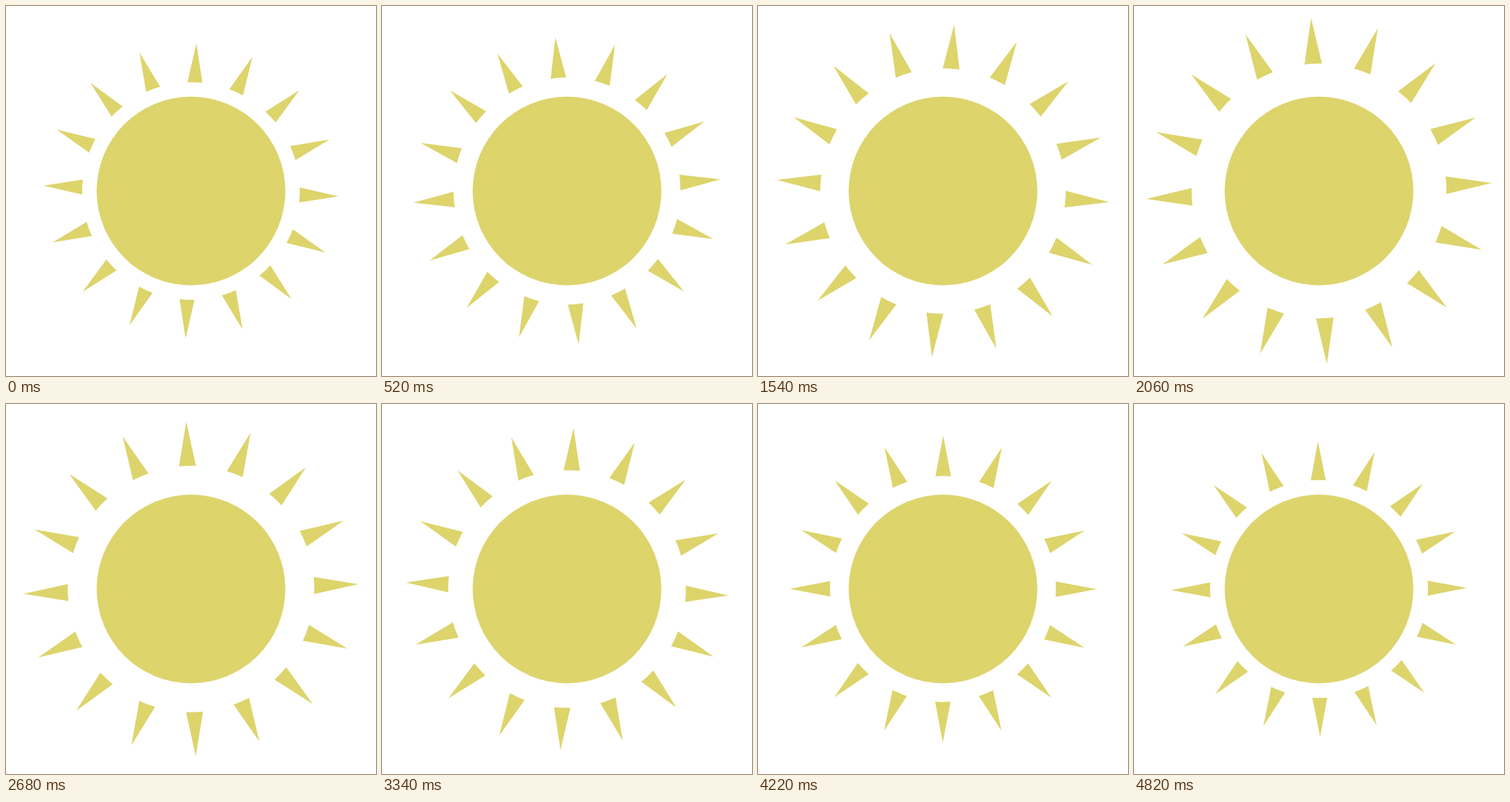
An HTML page that plays this animation: 500x500 px, repeating every 4.84 s.

```html
<!DOCTYPE html>
<html lang="en">
<head>
<meta charset="utf-8">
<title>Sun</title>
<style>
  html, body { margin: 0; height: 100%; overflow: hidden; background: #fff; }
  svg { display: block; width: 100%; height: 100%; fill: #ddd46c; }

  /* Stepped at 50 pictures per second: 103 growing, 139 shrinking. */
  #rays {
    transform-origin: 0 0;
    animation: spin 4840ms steps(242) infinite, pulse 4840ms infinite;
  }
  @keyframes spin {
    from { rotate: 2.09deg; }
    to { rotate: 361.07deg; }
  }
  @keyframes pulse {
    0% { scale: 1; animation-timing-function: steps(103); }
    42.562% { scale: 1.171; animation-timing-function: steps(139); }
    100% { scale: 1; }
  }
</style>
</head>
<body>
<svg viewBox="-250 -250 500 500">
  <defs>
    <path id="ray" d="M0 -199.6L10.1 -146.7A147 147 0 0 0 -10.1 -146.7Z"/>
  </defs>
  <g id="rays"></g>
  <circle r="127.5"/>
</svg>
<script>
  const RAYS = 16;
  const rays = document.getElementById('rays');
  for (let i = 0; i < RAYS; i++) {
    const ray = document.createElementNS('http://www.w3.org/2000/svg', 'use');
    ray.setAttribute('href', '#ray');
    ray.setAttribute('transform', `rotate(${i * 360 / RAYS})`);
    rays.append(ray);
  }
</script>
</body>
</html>
```
